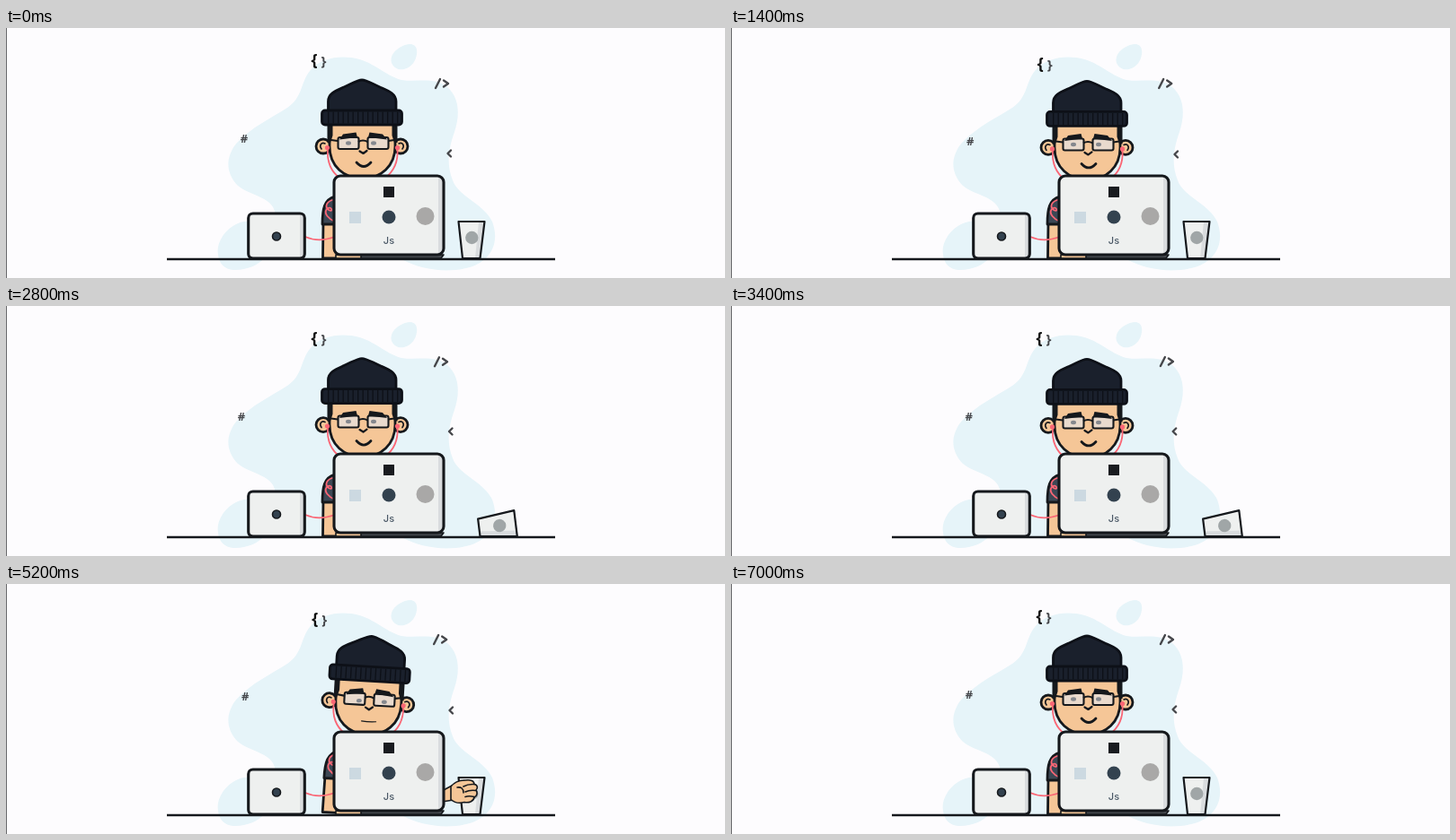
These frames come from a looping animation (800x279 px, 7.1 s). An HTML page:

```html
<!DOCTYPE html>
<html lang="en">
<head>
<meta charset="utf-8">
<title>Developer at a desk</title>
<style>
  html, body { margin: 0; width: 100%; height: 100%; overflow: hidden; background: #fdfcfe; }
  svg { display: block; width: 100vw; height: 100vh; }
  .ink { stroke: #15181c; stroke-width: 2.8; stroke-linejoin: round; stroke-linecap: round; }
  .thin { stroke-width: 1.6; }
  .case { stroke-width: 3.1; }
  .skin { fill: #f5c697; }
  .shell { fill: #eef0ef; }
  .shade { fill: #d9dcde; }
  .line { fill: none; }
  .cord { fill: none; stroke: #fa6675; stroke-width: 1.8; stroke-linecap: round; }
  .sign { font: bold 13px "Noto Sans", sans-serif; fill: #45464a; text-anchor: middle; }
  .mark { fill: none; stroke: #45464a; stroke-width: 2.4; stroke-linejoin: round; stroke-linecap: round; }
</style>
</head>
<body>
<svg viewBox="0 0 800 279">
  <path d="M.5 0V279" stroke="#68686b"/>
  <g fill="#e6f4f9">
    <path d="M338 48C349 34 368 31 384 33C408 36 421 53 440 58C458 61 476 54 491 66C505 78 505 98 499 116C492 136 490 152 497 170C504 189 532 196 541 216C550 240 539 260 516 267C491 274 462 270 440 258H300V211C300 188 272 188 258 176C243 161 245 142 257 128C273 111 294 101 313 89C330 78 328 60 338 48Z"/>
    <path d="M236 253C233 238 247 219 265 216C285 213 300 230 294 248C286 264 267 271 253 270C243 269 237 263 236 253Z"/>
    <path d="M429 39C426 29 437 20 448 18C458 17 459 27 455 36C450 47 434 51 429 39Z"/>
  </g>

  <g id="braces" class="sign">
    <text x="343" y="42" style="font-size:18px;fill:#111">{</text>
    <text x="353.5" y="42" style="font-size:15px">}</text>
  </g>
  <text id="hash" class="sign" x="265" y="127.500">#</text>
  <path id="tag" class="mark" d="M483 57L478 67M487 58.500L492 62L487 65.500"/>
  <path id="angle" class="mark" d="M495 136.500L491.500 140L495 143.500"/>

  <g id="body">
    <path class="skin ink" d="M353 217L352.500 257H385V217Z"/>
    <path class="ink" fill="#3c4855" d="M352 219C352 202 354 191 366 188H420V219Z"/>
    <path class="cord" d="M366 216C359 213 353 207 357 202C362 197 365 207 359 203C354 199 357 194 363 192"/>
    <g id="head">
      <g class="skin ink">
        <circle cx="353" cy="132" r="8"/>
        <circle cx="439" cy="132" r="8"/>
        <path d="M360 104H433V132C433 154 417 168 397 168C376 168 360 154 360 132Z"/>
      </g>
      <path class="line ink thin" d="M351 135C348 131 351 127 355 129M441 135C444 131 441 127 437 129"/>
      <path fill="#15181c" d="M357.500 104H363.500V120L361 128H357.500ZM435.500 104H429.500V120L432 128H435.500Z"/>
      <path class="cord" d="M358 135C357 149 361 160 372 168M435.500 135C436.500 149 432 160 421 168"/>
      <circle cx="357.500" cy="133.500" r="2.600" fill="#fa6675"/>
      <circle cx="435.500" cy="133.500" r="2.600" fill="#fa6675"/>
      <g fill="#e9dacd" stroke="#15181c" stroke-width="2.100">
        <rect x="369.500" y="122" width="23" height="13" rx="2"/>
        <rect x="402.500" y="122" width="23" height="13" rx="2"/>
        <path fill="none" d="M392 127Q397 124 402.500 127M369 126L358 124.500M425.500 126L435 124.500"/>
      </g>
      <g id="eyes" fill="#85888e">
        <ellipse cx="381" cy="128.500" rx="3" ry="2.200"/>
        <ellipse cx="409" cy="128.500" rx="3" ry="2.200"/>
      </g>
      <path fill="#15181c" d="M371 124.500L375 118.500L389.500 116.500L391 122ZM424 124.500L419 118.500L404.500 116.500L403 122Z"/>
      <path class="line ink" style="stroke-width:2.200" d="M393.500 137.500L397.500 140L401.500 137"/>
      <path id="mouth" class="line ink"/>
      <g class="ink" style="stroke:#0d1017" fill="#1a202c">
        <path d="M358.500 94V82C358.500 73 367 70 376 66C385 62 391 58 396 58C401 58 407 62 416 66C425 70 434 73 434 82V94Z"/>
        <rect x="351.500" y="92" width="89" height="16" rx="3.500"/>
        <path stroke-dasharray="1.300 4.200" style="stroke-width:13;stroke-linecap:butt" d="M358 100H437"/>
      </g>
    </g>
  </g>

  <g id="cup">
    <path class="shell" d="M503.500 216H532.500L527.500 257H508Z"/>
    <path class="shade" d="M526 216H532.500L527.500 257H522Z"/>
    <path class="line ink" style="stroke-width:2.200" d="M503.500 216H532.500L527.500 257H508Z"/>
    <circle cx="518.300" cy="234" r="7.200" fill="#a0a6a7"/>
  </g>

  <g id="hand" class="skin ink thin">
    <path d="M440 229H487L500 222V239L487 241H440Z"/>
    <path d="M497 224C501 219 508 217 513 217C519 216 523 218 523 221.500C527 222 527 226 525 228C527 231 526 235 523 236C522 241 517 242.500 512 241.500C507 243 501 242 497 238.500Z"/>
    <path class="line" d="M523 221.500Q516 221 511 224M525 228.500Q518 227.500 513 230M523 235.500Q517 234 513 235.500M504 225Q511 224 511 231"/>
  </g>

  <path class="cord" d="M333 233C344 238 355 237 366 233"/>
  <path class="ink" style="stroke-width:2.500;stroke-linecap:butt" d="M179 258H611"/>
  <path class="ink skin thin" d="M367 253H405V257H367Z"/>
  <path class="ink thin" fill="#45494e" d="M395 253H487L484 257H395Z"/>

  <rect class="shell" x="365" y="165" width="122" height="88" rx="7"/>
  <path class="shade" d="M481 166H483Q487 167 487 172V247Q487 252 481 253Z"/>
  <rect class="line ink case" x="365" y="165" width="122" height="88" rx="7"/>
  <rect x="420" y="177" width="12" height="12" fill="#1a1c20"/>
  <rect x="382" y="205" width="13" height="13" fill="#ccd9e1"/>
  <circle cx="426" cy="211" r="7.500" fill="#33424f"/>
  <circle cx="466.500" cy="210" r="10" fill="#a9a8a7"/>
  <text x="426" y="241" text-anchor="middle" font-family="Inter, sans-serif" font-size="11" font-weight="500" fill="#4a5866">Js</text>

  <rect class="shell" x="269.700" y="207" width="62.600" height="50" rx="5"/>
  <path class="shade" d="M327 207Q332 208 332 212V252Q332 256 327 257Z"/>
  <rect class="line ink case" x="269.700" y="207" width="62.600" height="50" rx="5"/>
  <circle class="ink thin" cx="301" cy="232.500" r="4.500" fill="#33424f"/>
</svg>
<script>
  const LOOP = 7100, STEP = 100, DRIFT = LOOP / 2;
  const el = id => document.getElementById(id);
  const place = (id, transform) => el(id).setAttribute('transform', transform);
  const smooth = u => u * u * (3 - 2 * u);

  // Each stop is [time, ...values]; values ease from stop to stop.
  function tween(time, stops, ease = smooth) {
    const next = stops.findIndex(s => s[0] > time);
    if (next === 0) return stops[0].slice(1);
    if (next < 0) return stops.at(-1).slice(1);
    const a = stops[next - 1], b = stops[next];
    const u = ease((time - a[0]) / (b[0] - a[0]));
    return a.slice(1).map((v, i) => v + (b[i + 1] - v) * u);
  }

  // Offsets at each fifth of the drift cycle.
  const drifts = {
    braces: [[0, 0], [.7, 2.5], [1.2, 4.2], [-.4, -.5], [0, 0]],
    hash: [[0, 0], [0, 1.5], [1.2, 3.2], [1, 1], [-3, 0]],
    tag: [[0, 0], [-2.5, -2], [-1.8, 0], [-2, .3], [-1, .3]],
    angle: [[0, 0], [3, 0], [2, 1], [2, 1], [1.5, 0]]
  };

  function draw(t) {
    for (const [id, points] of Object.entries(drifts)) {
      const stops = [...points, points[0]].map((p, i) => [i / 5, ...p]);
      place(id, `translate(${tween(t % DRIFT / DRIFT, stops)})`);
    }

    const [lean] = tween(t, [[4100, 0], [4500, 1], [5400, 1], [5800, 0]]);
    const bob = .8 * (1 - Math.cos(t / 500 * Math.PI)) * (1 - lean);
    place('body', `rotate(${lean * 3.3} 396 250)`);
    place('head', `translate(0 ${bob})`);
    place('eyes', `translate(${lean * 5} ${lean * 2})`);
    el('mouth').setAttribute('d', `M390 ${150 + lean * 3}Q398 ${159 - lean * 5} 406 ${150 + lean * 3}`);
    el('mouth').style.strokeWidth = 2.8 - lean * 1.6;

    const [angle] = t < 4000
      ? tween(t, [[2300, 0], [2800, 83]], u => u * u)
      : tween(t, [[4800, 83], [5200, 0]]);
    place('cup', `rotate(${angle} 527.5 257)`);
    place('hand', `translate(${tween(t, [
      [4150, -60, 0], [4600, 0, 0], [4800, 12, 10], [5200, -2, 2], [5400, -2, 2], [5800, -60, 0]
    ])})`);
  }

  function tick(now) {
    draw(Math.floor(now % LOOP / STEP) * STEP);
    requestAnimationFrame(tick);
  }
  requestAnimationFrame(tick);
</script>
</body>
</html>
```
